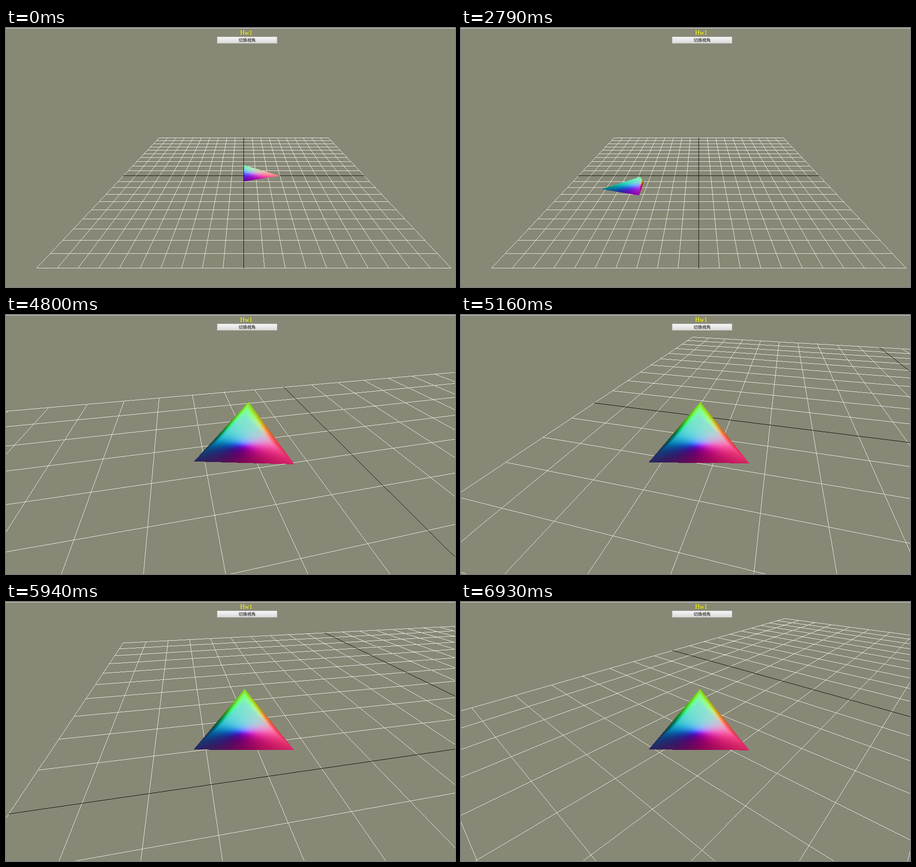
Animation, 985 px wide and 569 px high, one loop 6960 ms. Source, as an HTML page with a canvas:

```html
<!DOCTYPE html>
<html lang="zh-Hant">
<head>
<meta charset="utf-8">
<style>
html, body { margin: 0; width: 100%; height: 100%; overflow: hidden; background: #888877; }
canvas { position: absolute; left: 0; top: 0; }
#rule { position: absolute; left: 0; top: 0; width: 985px; height: 1px; background: #dcdcdc; }
#title { position: absolute; left: 427px; top: 2px; width: 200px; text-align: center; color: #ff0;
  font: 14px/17px "Liberation Serif", "Times New Roman", serif; }
#button { position: absolute; left: 463px; top: 19px; width: 132px; height: 15px; box-sizing: border-box;
  border: 1px solid #c4c4c0; background: linear-gradient(#f6f6f6, #dadada); color: #000; text-align: center;
  font: 9.33px/12px "Noto Sans CJK TC", "Noto Sans CJK", sans-serif; }
</style>
</head>
<body>
<canvas id="stage" width="985" height="569"></canvas>
<div id="rule"></div>
<div id="title">Hw1</div>
<div id="button">切換視角</div>
<script>
const W = 985, H = 569, CX = 521.7, CY = 324.9;
const LOOP = 6960, STEP = 30, SWITCH = 3990, LAG = 16.7;
const ctx = document.getElementById('stage').getContext('2d');
const image = ctx.createImageData(W, H);
const pixels = new Uint32Array(image.data.buffer);
const rgb = (r, g, b) => (255 << 24 | b << 16 | g << 8 | r) >>> 0;
const BACK = rgb(136, 136, 119), LIGHT = rgb(236, 236, 232), DARK = rgb(12, 12, 10);

// time, x, z, heading in degrees
const path = [
  [720, 0, 0, 0], [1230, 0, 0, 85], [1440, -.55, 2.7, 123], [2160, -18, 16.1, 150],
  [2790, -43.3, 21.6, 178.5], [2880, -47.4, 22, 180.5], [3600, -59.6, 22.4, 181],
  [4320, -62, 22.5, 181], [4680, -62.2, 22.5, 181], [4800, -62.2, 22.5, 193.2],
  [5040, -62.4, 21.6, 247], [5490, -64.4, 9.9, 267.1], [6360, -58.9, -26.3, 295.2], [6930, -44.2, -44.9, 317.7]
];

const secant = (i, k) => (path[i + 1][k] - path[i][k]) / (path[i + 1][0] - path[i][0]);

function slope(i, k) {
  if (i === 0) return secant(0, k);
  if (i === path.length - 1) return secant(i - 1, k);
  const a = secant(i - 1, k), b = secant(i, k);
  return a * b > 0 ? 2 * a * b / (a + b) : 0;
}

// monotone cubic through the path
function sample(t, k) {
  t = Math.max(path[0][0], Math.min(LOOP, t));
  let i = 0;
  while (i < path.length - 2 && t > path[i + 1][0]) i++;
  const h = path[i + 1][0] - path[i][0], s = (t - path[i][0]) / h, q = 1 - s;
  return path[i][k] * (1 + 2 * s) * q * q + path[i + 1][k] * s * s * (3 - 2 * s)
    + h * s * q * (slope(i, k) * q - slope(i + 1, k) * s);
}

function direction(degrees) {
  const a = degrees * Math.PI / 180;
  return [Math.cos(a), Math.sin(a)];
}

function camera(x, y, z, forward, pitch, focal) {
  const [fx, fz] = forward, c = Math.cos(pitch), s = Math.sin(pitch);
  const turn = ([dx, dy, dz]) => {
    const ahead = dx * fx + dz * fz;
    return [dz * fx - dx * fz, dy * c + ahead * s, ahead * c - dy * s];
  };
  return {
    turn,
    view: p => turn([p[0] - x, p[1] - y, p[2] - z]),
    screen: v => [CX + focal * v[0] / v[2], CY - focal * v[1] / v[2]]
  };
}

function line(cam, from, to, color) {
  const near = 4;
  let a = cam.view(from), b = cam.view(to);
  if (a[2] < near && b[2] < near) return;
  if (a[2] > b[2]) [a, b] = [b, a];
  if (a[2] < near) {
    const k = (near - a[2]) / (b[2] - a[2]);
    a = a.map((v, i) => v + (b[i] - v) * k);
  }
  const [x0, y0] = cam.screen(a), [x1, y1] = cam.screen(b);
  const n = Math.ceil(Math.max(Math.abs(x1 - x0), Math.abs(y1 - y0))) || 1;
  for (let i = 0; i <= n; i++) {
    const x = Math.floor(x0 + (x1 - x0) * i / n), y = Math.floor(y0 + (y1 - y0) * i / n);
    if (x >= 0 && x < W && y >= 0 && y < H) pixels[y * W + x] = color;
  }
}

function grid(cam) {
  const pair = (v, color) => {
    line(cam, [v, 0, -100], [v, 0, 100], color);
    line(cam, [-100, 0, v], [100, 0, v], color);
  };
  for (let v = -100; v <= 100; v += 10) if (v) pair(v, LIGHT);
  pair(0, DARK);
}

// nose, top, right, left; the floor side is never seen
const corners = [[30, 0, 0], [0, 10, 0], [0, 0, 10], [0, 0, -10]];
const normals = [[1, 0, 0], [0, 1, 0], [-1, -3, 3], [-1, -3, -3]].map(n => n.map(v => v / Math.hypot(...n)));
const faces = [[0, 1, 2], [0, 3, 1], [1, 3, 2]];

function triangle(points, depths, shades) {
  const [a, b, c] = points;
  const edge = (p, q, x, y) => (q[0] - p[0]) * (y - p[1]) - (q[1] - p[1]) * (x - p[0]);
  const area = edge(a, b, c[0], c[1]);
  if (area > -1e-6) return;
  const range = (k, max) => {
    const v = points.map(p => p[k]);
    return [Math.max(0, Math.floor(Math.min(...v))), Math.min(max - 1, Math.ceil(Math.max(...v)))];
  };
  const [left, right] = range(0, W), [top, bottom] = range(1, H);
  for (let y = top; y <= bottom; y++) for (let x = left; x <= right; x++) {
    const px = x + .5, py = y + .5;
    const wa = edge(b, c, px, py) / area, wb = edge(c, a, px, py) / area, wc = 1 - wa - wb;
    if (wa < 0 || wb < 0 || wc < 0) continue;
    const ka = wa / depths[0], kb = wb / depths[1], kc = wc / depths[2];
    const n = [0, 1, 2].map(i => ka * shades[0][i] + kb * shades[1][i] + kc * shades[2][i]);
    const len = Math.hypot(n[0], n[1], n[2]);
    const tone = v => Math.round(127.5 + 127.5 * v / len);
    pixels[y * W + x] = rgb(tone(n[0]), tone(n[1]), tone(-n[2]));
  }
}

function ship(cam, x, z, forward) {
  const [fx, fz] = forward;
  const place = ([a, h, r]) => [a * fx - r * fz, h, a * fz + r * fx];
  const views = corners.map(p => {
    const q = place(p);
    return cam.view([q[0] + x, q[1], q[2] + z]);
  });
  const shades = normals.map(n => cam.turn(place(n)));
  for (const f of faces) {
    triangle(f.map(i => cam.screen(views[i])), f.map(i => views[i][2]), f.map(i => shades[i]));
  }
}

function draw(t) {
  const x = sample(t, 1), z = sample(t, 2), behind = direction(sample(t, 3));
  const follow = t >= SWITCH;
  const cam = follow
    ? camera(x - 40 * behind[0], 30, z - 40 * behind[1], behind, Math.atan(.75), 552)
    : camera(0, 95.2, 190.9, [0, -1], Math.atan2(95.2, 190.9), 563);
  // the chasing camera trails the turn slightly
  const forward = follow ? direction(sample(t + LAG, 3)) : behind;
  pixels.fill(BACK);
  grid(cam);
  ship(cam, x, z, forward);
  ctx.putImageData(image, 0, 0);
}

const start = performance.now();
function tick() {
  const t = Math.max(0, performance.now() - start) % LOOP;
  draw(Math.floor(t / STEP) * STEP);
  requestAnimationFrame(tick);
}
tick();
</script>
</body>
</html>
```
